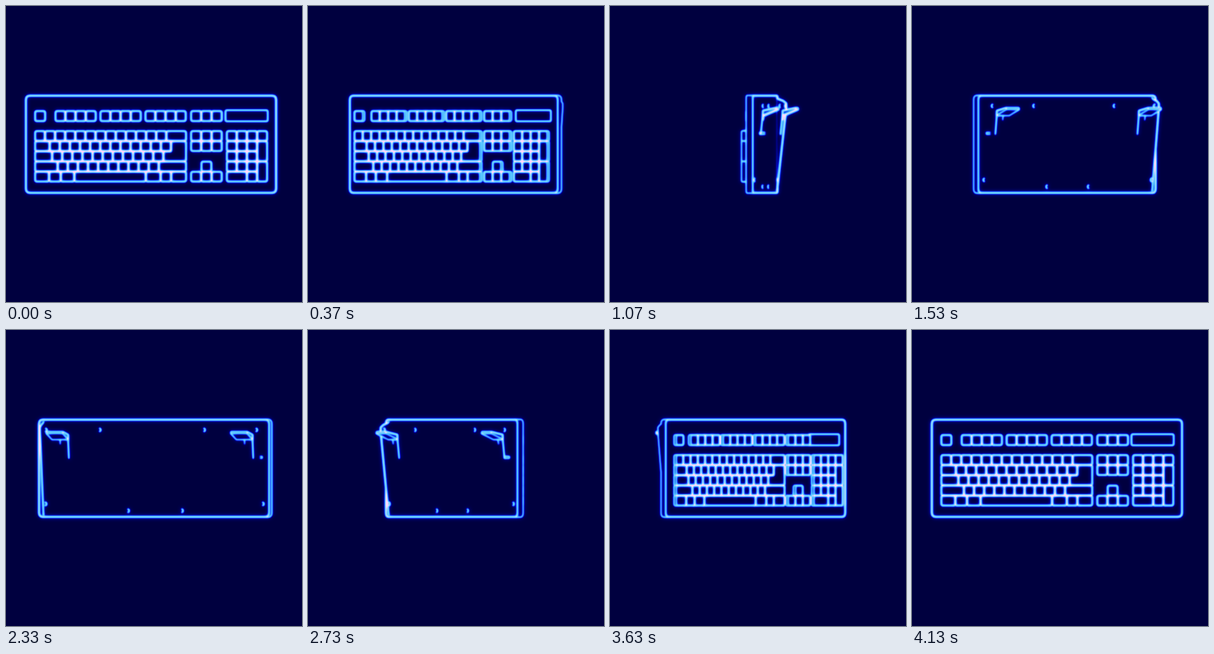
An HTML page with a canvas that plays this animation: 480 px wide and 480 px high, repeating every 4.16 s.

```html
<!DOCTYPE html>
<html>
<head>
<meta charset="utf-8">
<title>Neon keyboard</title>
<style>
html, body { margin: 0; width: 100%; height: 100%; overflow: hidden; background: #000040; }
canvas { display: block; filter: url(#neon); }
svg { position: absolute; }
</style>
</head>
<body>
<svg width="0" height="0">
  <filter id="neon" x="0" y="0" width="1" height="1" color-interpolation-filters="sRGB">
    <feGaussianBlur in="SourceGraphic" stdDeviation="1" result="core"/>
    <feGaussianBlur in="SourceGraphic" stdDeviation="3.2" result="glow"/>
    <feComposite in="core" in2="glow" operator="arithmetic" k2="0.8" k3="0.6"/>
    <feComponentTransfer>
      <feFuncR type="table" tableValues="0 0 .02 .08 .18 .27 .33 .42 .62 .9 1"/>
      <feFuncG type="table" tableValues="0 0 .04 .18 .45 .66 .76 .8 .82 .84 .85"/>
      <feFuncB type="table" tableValues=".25 .42 .72 .96 1 1 1 1 1 1 1"/>
    </feComponentTransfer>
  </filter>
</svg>
<canvas width="480" height="480"></canvas>
<script>
const LOOP = 4160, STEPS = 125;
const FRONT = -1, SEAM = -11, KEY_BASE = 3.5, KEY_TOP = 8;
const ctx = document.querySelector('canvas').getContext('2d');
ctx.lineJoin = ctx.lineCap = 'round';
let c, s;

// Orthographic view of a point turned about the vertical axis
const at = (x, y, z) => [240 + x * c - z * s, y];
const mix = (a, b, t) => a.map((v, i) => v + (b[i] - v) * t);

function rounded(pts, r) {
  return pts.flatMap((p, i) => {
    const toward = q => mix(p, q, r / Math.hypot(q[0] - p[0], q[1] - p[1]));
    const a = toward(pts.at(i - 1)), b = toward(pts[(i + 1) % pts.length]);
    return [0, .33, .67, 1].map(t => mix(mix(a, p, t), mix(p, b, t), t));
  });
}
// Screen coordinates are measured on the front view
const rect = (x0, y0, x1, y1, r) =>
  rounded([[x0, y0], [x1, y0], [x1, y1], [x0, y1]].map(([x, y]) => [x - 240, y]), r);

const face = (pts, z) => pts.map(([x, y]) => at(x, y, z));
const profile = (pts, x) => pts.map(([z, y]) => at(x, y, z));

function sweep(a, b) {
  const sides = a.map((p, i) => {
    const j = (i + 1) % a.length;
    return [p, a[j], b[j], b[i]];
  });
  return [a, b, ...sides];
}

// Outline of the union: every polygon gets the same winding
function solid(polys) {
  const path = new Path2D();
  for (const poly of polys) {
    let area = 0;
    poly.forEach((p, i) => {
      const q = poly[(i + 1) % poly.length];
      area += p[0] * q[1] - q[0] * p[1];
    });
    const pts = area < 0 ? [...poly].reverse() : poly;
    path.moveTo(...pts[0]);
    pts.forEach(p => path.lineTo(...p));
    path.closePath();
  }
  ctx.lineWidth = 3;
  ctx.stroke(path);
  ctx.fill(path);
}

function line(pts, closed, width = 1.4) {
  ctx.beginPath();
  pts.forEach(p => ctx.lineTo(...p));
  if (closed) ctx.closePath();
  ctx.lineWidth = width;
  ctx.stroke();
}

const keys = [];
const GAP = .8;
const key = (x0, y0, x1, y1) => keys.push(rect(x0 + GAP, y0 + GAP, x1 - GAP, y1 - GAP, 2));
const row = (y, xs, h = 16.5) =>
  xs.slice(1).forEach((x, i) => key(xs[i], y, x, y + h));
const run = (x, n, pitch = 16.4) => Array.from({ length: n + 1 }, (_, i) => x + i * pitch);
const Y = run(202.5, 5, 16.5);

row(170, [47, 64], 17);
for (const x of [80, 153, 226]) row(170, run(x, 4, 16.5), 17);
row(170, run(300, 3, 16.8), 17);
row(Y[0], [...run(47, 13), 292.5]);
row(Y[1], [47, ...run(71, 12)]);
row(Y[2], [47, ...run(75, 11)]);
row(Y[3], [47, ...run(84, 10), 292.5]);
row(Y[4], [47, 70, 89, 111, 227, 251, 268, 292.5]);
keys.push(rounded([[28.6, Y[1] + GAP], [51.7, Y[1] + GAP], [51.7, Y[3] - GAP],
  [16.2, Y[3] - GAP], [16.2, Y[2] + GAP], [28.6, Y[2] + GAP]], 2));
row(Y[0], run(300, 3, 16.8));
row(Y[1], run(300, 3, 16.8));
row(Y[3], [316.8, 333.6]);
row(Y[4], run(300, 3, 16.8));
row(Y[0], run(358, 4, 16.5));
for (const i of [1, 2, 3]) row(Y[i], run(358, 3, 16.5));
row(Y[4], [358, 391, 407.5]);
key(407.5, Y[1], 424, Y[3]);
key(407.5, Y[3], 424, Y[5]);
keys.sort((a, b) => a[0][0] - b[0][0]);

const slab = rect(32.5, 145.7, 437.7, 302.7, 6);
const panel = rect(356, 169, 424.5, 187, 2);
const wedge = [[SEAM, 149], [-13, 151], [-21, 154], [-26, 158], [-26, 165], [SEAM, 300]];
const wedgeEnds = [-200, 190];
const foot = [[-25, 170], [-46.5, 165.5], [-47, 167.5], [-25, 177]];
const feet = [[-184, -156], [141, 169]];
const screws = [[85, 162], [-99, 162], [-191, 162], [180, 162],
  [186, 282], [-197, 282], [41, 293], [-54, 293]];
const surface = y => -26 + Math.max(0, y - 165) * .111;

function drawKeys() {
  for (const k of s > 0 ? keys : [...keys].reverse()) {
    const top = face(k, KEY_TOP);
    solid(sweep(face(k, KEY_BASE), top));
    if (c > 0) line(top, true);
  }
}

function drawFeet() {
  for (const [x0, x1] of feet) {
    const a = profile(foot, x0), b = profile(foot, x1);
    solid(sweep(a, b));
    line([a[2], b[2]]);
    line(s > 0 ? b : a, true);
  }
}

function drawBody() {
  solid([
    ...sweep(face(slab, FRONT), face(slab, SEAM)),
    ...sweep(...wedgeEnds.map(x => profile(wedge, x)))
  ]);
}

function drawBack() {
  line(face(slab, SEAM), true, 2);
  const [far, near] = s > 0 ? wedgeEnds : [...wedgeEnds].reverse();
  const edge = profile(wedge, far);
  ctx.beginPath();
  edge.forEach(p => ctx.lineTo(...p));
  ctx.fill();
  line(edge, false, 2);

  // Crescent screw heads
  const turn = s > 0 ? Math.PI / 2 : -Math.PI / 2;
  for (const [x, y] of screws) {
    ctx.beginPath();
    ctx.ellipse(...at(x, y, surface(y)), .8 + 1.4 * Math.abs(c), 2.5, 0, turn, turn + Math.PI);
    ctx.stroke();
  }
  const z = surface(206);
  line([at(near, 205, z - 9), at(near, 205, z), at(near, 208, z), at(near, 208, z - 9)]);

  for (const [x0, x1] of feet) {
    const x = s > 0 ? x1 : x0, mid = (x0 + x1) / 2;
    line([at(x, 172, -25), at(x, 208, surface(208))], false, 2);
    line([at(mid, 177, -25), at(mid, 185, -24)]);
  }
}

function draw(now) {
  const step = Math.floor(now % LOOP / LOOP * STEPS + .1);
  const turn = step / STEPS * 2 * Math.PI, side = Math.sin(turn);
  const angle = turn + .025 + .008 * side + .028 * side ** 2;
  c = Math.cos(angle);
  s = Math.sin(angle);
  ctx.fillStyle = '#000';
  ctx.strokeStyle = '#fff';
  ctx.fillRect(0, 0, 480, 480);
  if (c > 0) {
    drawFeet();
    drawBody();
    line(face(slab, FRONT), true, 2);
    line(face(panel, FRONT), true, 2);
    drawKeys();
  } else {
    drawKeys();
    drawBody();
    drawBack();
    drawFeet();
  }
  requestAnimationFrame(draw);
}
draw(0);
</script>
</body>
</html>
```
